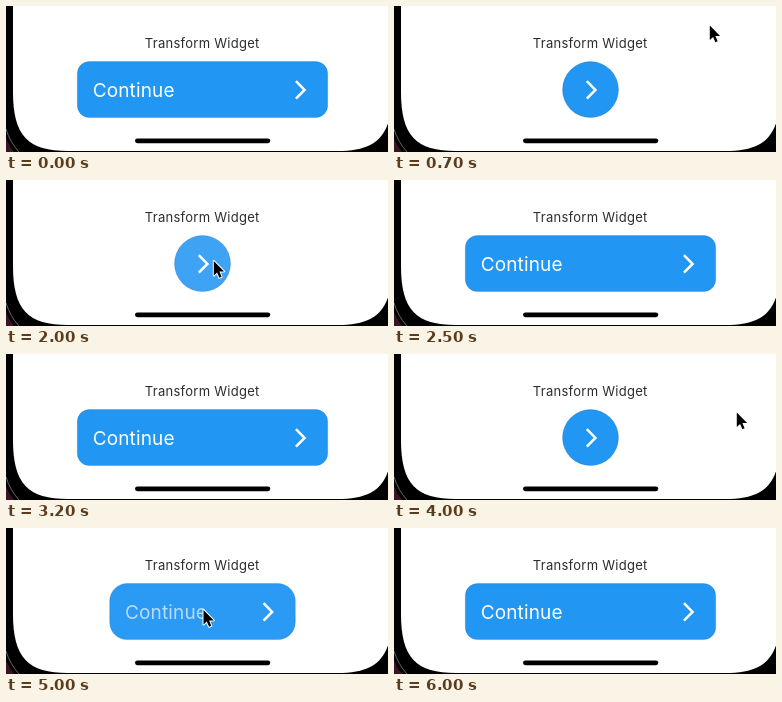
An HTML page with a canvas that plays this animation: 382 by 146 pixels, repeating every 6.1 s.

```html
<!DOCTYPE html>
<html lang="en">
<head>
<meta charset="utf-8">
<title>Transform Widget</title>
<style>
  html, body { margin: 0; width: 100%; height: 100%; overflow: hidden; background: #fff; }
  canvas { display: block; width: 382px; height: 146px; }
</style>
</head>
<body>
<canvas id="stage"></canvas>
<script>
const W = 382, H = 146, LOOP = 6100, STEP = 100;
const canvas = document.getElementById('stage');
const ctx = canvas.getContext('2d');
const dpr = window.devicePixelRatio || 1;
canvas.width = W * dpr;
canvas.height = H * dpr;

// Each take starts collapsed, gets tapped, then stays expanded.
const takes = [
  { start: 700, arrive: 1500, press: 2000, hide: 2500, from: [315.8, 19.5], to: [207.8, 81] },
  { start: 4000, arrive: 4700, press: 4800, hide: 5400, fade: 5300, from: [342.8, 58.5], to: [197.5, 82] }
];
const GROW = 300;

const clamp = v => Math.max(0, Math.min(1, v));
const mix = (a, b, p) => a + (b - a) * p;
const ease = p => p * p * (3 - 2 * p);

function fillRound(x, y, w, h, r, color) {
  ctx.beginPath();
  ctx.roundRect(x, y, w, h, r);
  ctx.fillStyle = color;
  ctx.fill();
}

function text(label, x, y, size, color, spacing = 0) {
  ctx.font = `${size}px Inter, sans-serif`;
  ctx.letterSpacing = spacing + 'px';
  ctx.fillStyle = color;
  ctx.fillText(label, x, y);
}

function drawPhone() {
  ctx.fillStyle = '#000';
  ctx.fillRect(0, 0, W, H);

  // outer rim of the case
  ctx.beginPath();
  ctx.moveTo(0, 123);
  ctx.quadraticCurveTo(4, 136, 13, H);
  ctx.strokeStyle = '#666';
  ctx.lineWidth = 1;
  ctx.stroke();
  ctx.beginPath();
  ctx.moveTo(0, 132);
  ctx.quadraticCurveTo(3, 140, 8, H);
  ctx.lineTo(0, H);
  ctx.fillStyle = '#3a1424';
  ctx.fill();

  // screen, symmetric about the home indicator
  ctx.beginPath();
  ctx.moveTo(7, -1);
  ctx.lineTo(7, 86);
  ctx.bezierCurveTo(7, 130, 22, 145, 62, 145);
  ctx.lineTo(331, 145);
  ctx.bezierCurveTo(371, 145, 386, 130, 386, 86);
  ctx.lineTo(386, -1);
  ctx.fillStyle = '#fff';
  ctx.fill();

  fillRound(129, 132.4, 135.3, 4.8, 2.4, '#000');
  text('Transform Widget', 138.8, 42, 13, '#2c2c2c', 0.27);
}

function drawButton(open, glow) {
  const width = mix(56, 250.3, open), left = 196.5 - width / 2, right = left + width;
  const radius = mix(28, 12, open);
  const color = `rgb(${mix(33, 62, glow)},${mix(150, 162, glow)},${mix(243, 245, glow)})`;
  fillRound(left, 55.6, width, 56, radius, color);
  ctx.strokeStyle = 'rgba(20,90,150,0.5)';
  ctx.lineWidth = 0.5;
  ctx.stroke();

  if (open > 0) {
    ctx.save();
    ctx.beginPath();
    ctx.rect(left, 55, width - 40, 58);
    ctx.clip();
    ctx.globalAlpha = open;
    text('Continue', left + 15.3, 90.6, 19, '#fff', 0.15);
    ctx.restore();
  }

  const x = right - 27.5;
  ctx.beginPath();
  ctx.moveTo(x - 4.2, 75.2);
  ctx.lineTo(x + 4.4, 83.9);
  ctx.lineTo(x - 4.2, 92.6);
  ctx.strokeStyle = '#fff';
  ctx.lineWidth = 2.5;
  ctx.stroke();
}

function drawCursor(x, y, alpha) {
  const shape = [[0, 0], [0, 14.6], [3.3, 11.5], [5.6, 16.8], [7.8, 15.8], [5.6, 10.6], [10.3, 10.4]];
  ctx.save();
  ctx.globalAlpha = alpha;
  ctx.translate(x, y);
  ctx.beginPath();
  shape.forEach(([px, py]) => ctx.lineTo(px, py));
  ctx.closePath();
  ctx.strokeStyle = '#fff';
  ctx.lineWidth = 2;
  ctx.lineJoin = 'round';
  ctx.stroke();
  ctx.fillStyle = '#000';
  ctx.fill();
  ctx.restore();
}

function render(time) {
  const t = Math.floor(time % LOOP / STEP) * STEP;
  const take = takes.filter(k => t >= k.start).pop();
  ctx.setTransform(dpr, 0, 0, dpr, 0, 0);
  drawPhone();
  if (!take) {
    drawButton(1, 0);
    return;
  }
  const open = clamp((t - take.press) / GROW);
  drawButton(open, t >= take.press ? 1 - open : 0);
  if (t < take.hide) {
    const p = ease(clamp((t - take.start) / (take.arrive - take.start)));
    const alpha = t >= take.fade ? 0.5 : 1;
    drawCursor(mix(take.from[0], take.to[0], p), mix(take.from[1], take.to[1], p), alpha);
  }
}

const origin = performance.now();
function tick() {
  render(performance.now() - origin);
  requestAnimationFrame(tick);
}
tick();
</script>
</body>
</html>
```
